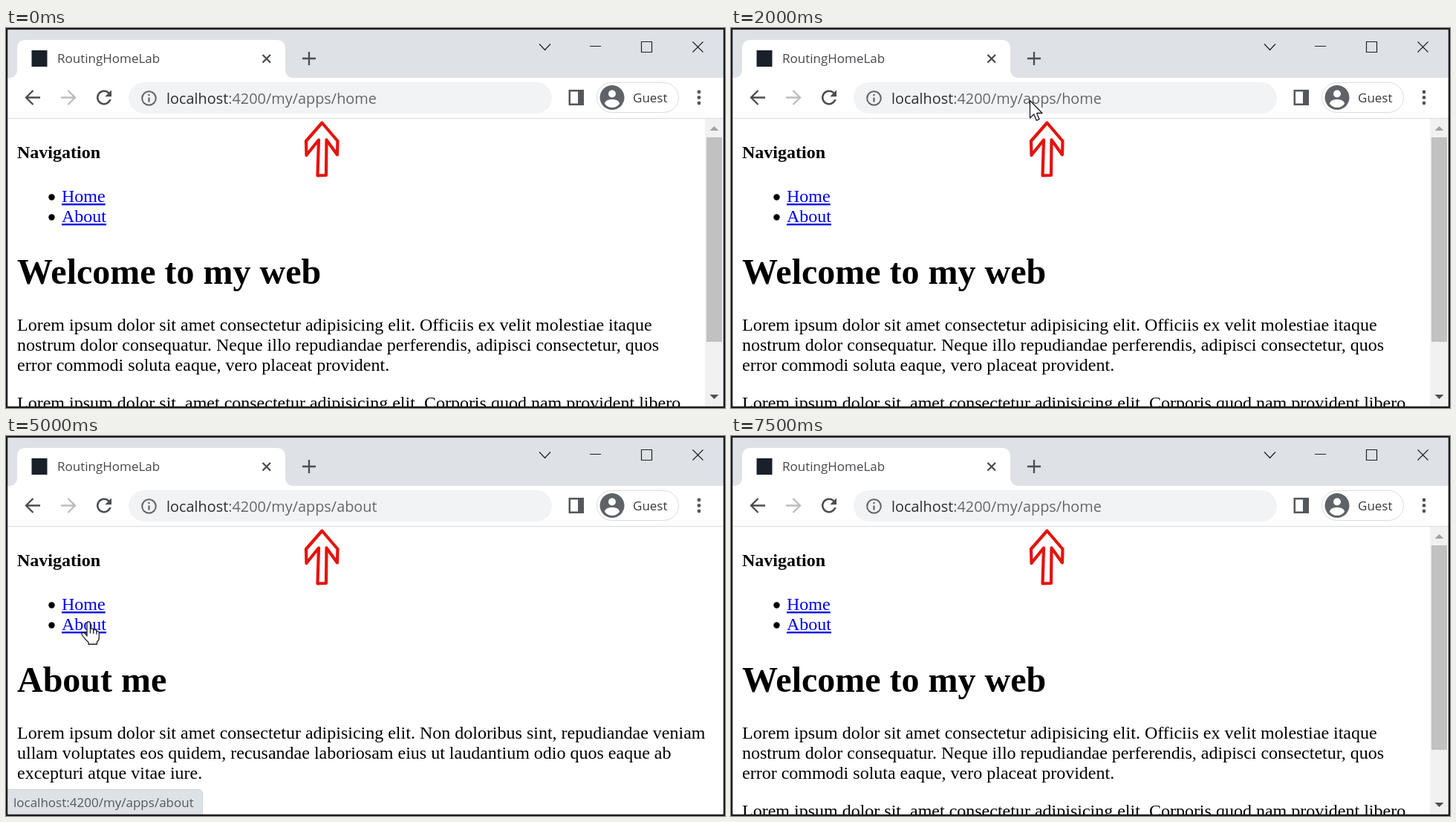
Write an HTML page that moves like this. It is 968x511 px and loops after 8 s.

```html
<!DOCTYPE html>
<html lang="en">
<head>
<meta charset="utf-8">
<title>Router demo</title>
<style>
html, body { margin: 0; width: 100%; height: 100%; overflow: hidden; background: #fff; }
svg { display: block; width: 968px; height: 511px; }
text { white-space: pre; }
.ui { font: 17px "Open Sans", "Noto Sans", sans-serif; fill: #45474a; }
.page { font: 24px "Liberation Serif", "Times New Roman", serif; fill: #000; }
.bold { font-weight: bold; }
.link { fill: #00e; text-decoration: underline; }
#url { font-size: 19.87px; fill: #64686c; }
#host { fill: #2c2e31; }
.focused #url, .focused #host { fill: #26313f; }
#title { font-size: 48px; font-weight: bold; }
.line { fill: none; stroke: #494c50; stroke-width: 2.3; }
.thin { fill: none; stroke: #222; stroke-width: 1.2; }
.cursor { fill: #fff; stroke: #1b1b2b; stroke-width: 1.3; stroke-linejoin: round; }
</style>
</head>
<body>
<svg id="stage" viewBox="0 0 968 511">
  <rect width="968" height="511" fill="#fff"/>

  <!-- tab strip -->
  <rect width="968" height="67" fill="#dee1e6"/>
  <path d="M3 67Q15 67 15 55V28Q15 16 27 16H364Q376 16 376 28V55Q376 67 388 67Z" fill="#fff"/>
  <rect x="34.5" y="30" width="21" height="22" fill="#1a2029"/>
  <text class="ui" x="69" y="47">RoutingHomeLab</text>
  <path class="line" d="M345.5 36l10.5 10.5M356 36l-10.5 10.5"/>
  <path class="line" d="M399 41h18M408 32v18" stroke-width="2.6"/>
  <path class="thin" d="M718 21.5l7.5 8 7.500-8M786 24.500h15M855.500 18.500h14v14h-14zM924.500 18.500l14 14M938.500 18.500l-14 14"/>

  <!-- toolbar -->
  <path class="line" d="M46 93.500H27.500M36.500 84l-9.500 9.500 9.500 9.500"/>
  <path class="line" d="M74 93.500H92.500M83.500 84l9.500 9.500-9.500 9.500" style="stroke:#babcbe"/>
  <path transform="translate(117 78.500) scale(1.250)" fill="#494c50"
    d="M17.650 6.350A8 8 0 1 0 19.730 14h-2.080A6 6 0 1 1 12 6c1.660 0 3.140.690 4.220 1.780L13 11h7V4z"/>
  <rect id="box" x="165" y="73" width="570" height="42" rx="21" fill="#f1f3f4"/>
  <g id="focus">
    <rect x="164.500" y="72.500" width="570" height="42" rx="21" fill="#fff" stroke="#1a6fe0" stroke-width="3"/>
    <rect x="216" y="78" width="284" height="33" fill="#99c2f5"/>
    <path class="line" stroke-width="2" d="M698 89v-2q0-3 3-3h2M713 84h2q3 0 3 3v2M718 99v2q0 3-3 3h-2M703 104h-2q-3 0-3-3v-2"/>
    <path fill="#5f6368" d="M702 88h5v5h-5zM709 88h5v5h-5zM702 95h5v5h-5zM709 95h5v5h-5z"/>
  </g>
  <circle class="line" cx="192.500" cy="94.500" r="9.300" style="stroke:#5f6368;stroke-width:2"/>
  <path d="M192.500 89v2.300M192.500 93.500v6" stroke="#5f6368" stroke-width="2.200"/>
  <text class="ui" id="url" x="216" y="102"><tspan id="host">localhost</tspan><tspan id="path"></tspan></text>
  <path d="M757.500 83h20.500v21h-20.500zM760 85.500v16h10v-16z" fill="#54575b" fill-rule="evenodd"/>
  <rect x="795.500" y="73.500" width="110" height="40" rx="20" fill="#fff" stroke="#dadce0"/>
  <circle cx="816" cy="93.500" r="16.500" fill="#5f6368"/>
  <circle cx="816" cy="88.500" r="5" fill="#fff"/>
  <path d="M806 102c0-8 20-8 20 0q-4 5-10 5t-10-5z" fill="#fff"/>
  <text class="ui" x="844" y="100" style="fill:#36383b">Guest</text>
  <g fill="#54575b"><circle cx="933" cy="86" r="2.400"/><circle cx="933" cy="93.500" r="2.400"/><circle cx="933" cy="101" r="2.400"/></g>
  <path d="M0 121.500H968" stroke="#dadce0"/>

  <!-- page -->
  <text class="page bold" x="15" y="175">Navigation</text>
  <circle cx="61.500" cy="227.500" r="4.200"/>
  <circle cx="61.500" cy="254.500" r="4.200"/>
  <text class="page link" x="75" y="234">Home</text>
  <text class="page link" x="75" y="261">About</text>
  <text class="page" id="title" x="15" y="343.500"></text>
  <g id="body"></g>
  <g id="scroll">
    <rect x="941" y="122" width="25" height="388" fill="#f1f1f1"/>
    <rect x="943" y="147" width="21" height="275" fill="#c1c1c1"/>
    <path d="M947.500 138l6-6 6 6z" fill="#a3a3a3"/>
    <path d="M947.500 493l6 6 6-6z" fill="#505050"/>
  </g>
  <path d="M425.500 127.500L446.500 152 446 170.500 431.500 150.500 431 198 419.500 198.500 421 150.500 404.500 171 404 152Z"
    fill="none" stroke="#e3140c" stroke-width="4.200" stroke-linejoin="round"/>

  <g id="status">
    <path id="bubble" fill="#dee1e6" stroke="#cfd2d7"/>
    <text class="ui" id="hint" x="10" y="498.500" style="fill:#55595e"></text>
  </g>
  <rect x="1" y="1" width="966" height="509" fill="none" stroke="#1d1b1e" stroke-width="2.400"/>

  <path class="cursor" id="arrow" d="M.5 .5V24L5.800 19 9.300 27.300 13.100 25.700 9.700 17.500H17Z"/>
  <g class="cursor" id="hand">
    <path d="M8 20V3Q8 .700 10.200 .700T12.500 3V11Q14 9.200 16.300 10.300L16.700 12Q18.800 10.600 20.500 12L20.900 13.700Q24.300 13 24.300 16V22Q24.300 26 21.500 28V31H10V28.500Q5 24 1.300 18.500 .300 15.500 3.500 15.300 6 16 8 20Z"/>
    <path d="M12.500 11v5.500M16.700 12v5M20.900 13.700v4" fill="none"/>
  </g>
</svg>
<script>
const $ = id => document.getElementById(id);
const LOOP = 8000;

const pages = {
  home: {
    title: "Welcome to my web",
    lines: [
      [407, "Lorem ipsum dolor sit amet consectetur adipisicing elit. Officiis ex velit molestiae itaque"],
      [434, "nostrum dolor consequatur. Neque illo repudiandae perferendis, adipisci consectetur, quos"],
      [461, "error commodi soluta eaque, vero placeat provident."],
      [512, "Lorem ipsum dolor sit, amet consectetur adipisicing elit. Corporis quod nam provident libero"]
    ]
  },
  about: {
    title: "About me",
    lines: [
      [407, "Lorem ipsum dolor sit amet consectetur adipisicing elit. Non doloribus sint, repudiandae veniam"],
      [434, "ullam voluptates eos quidem, recusandae laboriosam eius ut laudantium odio quos eaque ab"],
      [461, "excepturi atque vitae iure."]
    ]
  }
};

// start, page, hovered link, cursor, x, y, address focused
const steps = [
  [0, "home"],
  [500, "home", "", "arrow", 410, 153],
  [990, "home", "", "arrow", 402, 97],
  [1490, "home", "", "arrow", 402, 97, true],
  [2000, "home", "", "arrow", 402, 97],
  [2490, "home", "", "arrow", 300, 148],
  [2990, "home", "", "arrow", 120, 210],
  [3500, "home", "home", "hand", 108, 214],
  [4000, "home", "about", "hand", 108, 259],
  [4500, "about", "about", "hand", 108, 259],
  [5000, "about", "about", "hand", 101, 249],
  [5500, "home", "home", "hand", 97, 230],
  [6000, "home", "about", "hand", 106, 255],
  [6500, "about", "home", "hand", 97, 226],
  [7000, "home", "home", "arrow", 257, 287],
  [7500, "home"]
];

const show = (id, on) => { $(id).style.display = on ? "" : "none"; };

function render([, page, hover, cursor, x, y, focused]) {
  const { title, lines } = pages[page];
  $("path").textContent = ":4200/my/apps/" + page;
  $("title").textContent = title;
  $("body").innerHTML = lines
    .map(([top, s]) => `<text class="page" x="15" y="${top}">${s}</text>`).join("");
  show("scroll", page === "home");

  $("stage").classList.toggle("focused", !!focused);
  show("focus", focused);
  show("box", !focused);

  show("status", hover);
  if (hover) {
    const right = hover === "about" ? 264.5 : 263.5;
    $("hint").textContent = "localhost:4200/my/apps/" + hover;
    $("bubble").setAttribute("d", `M1 475.5H${right - 6}q6 0 6 6V512H1Z`);
  }

  for (const id of ["arrow", "hand"]) show(id, id === cursor);
  if (cursor) $(cursor).setAttribute("transform", `translate(${x} ${y})`);
}

let current;
const begin = performance.now();
function tick() {
  const t = Math.max(0, performance.now() - begin) % LOOP;
  const step = steps.filter(s => s[0] <= t).pop();
  if (step !== current) render(current = step);
  requestAnimationFrame(tick);
}
tick();
</script>
</body>
</html>
```
